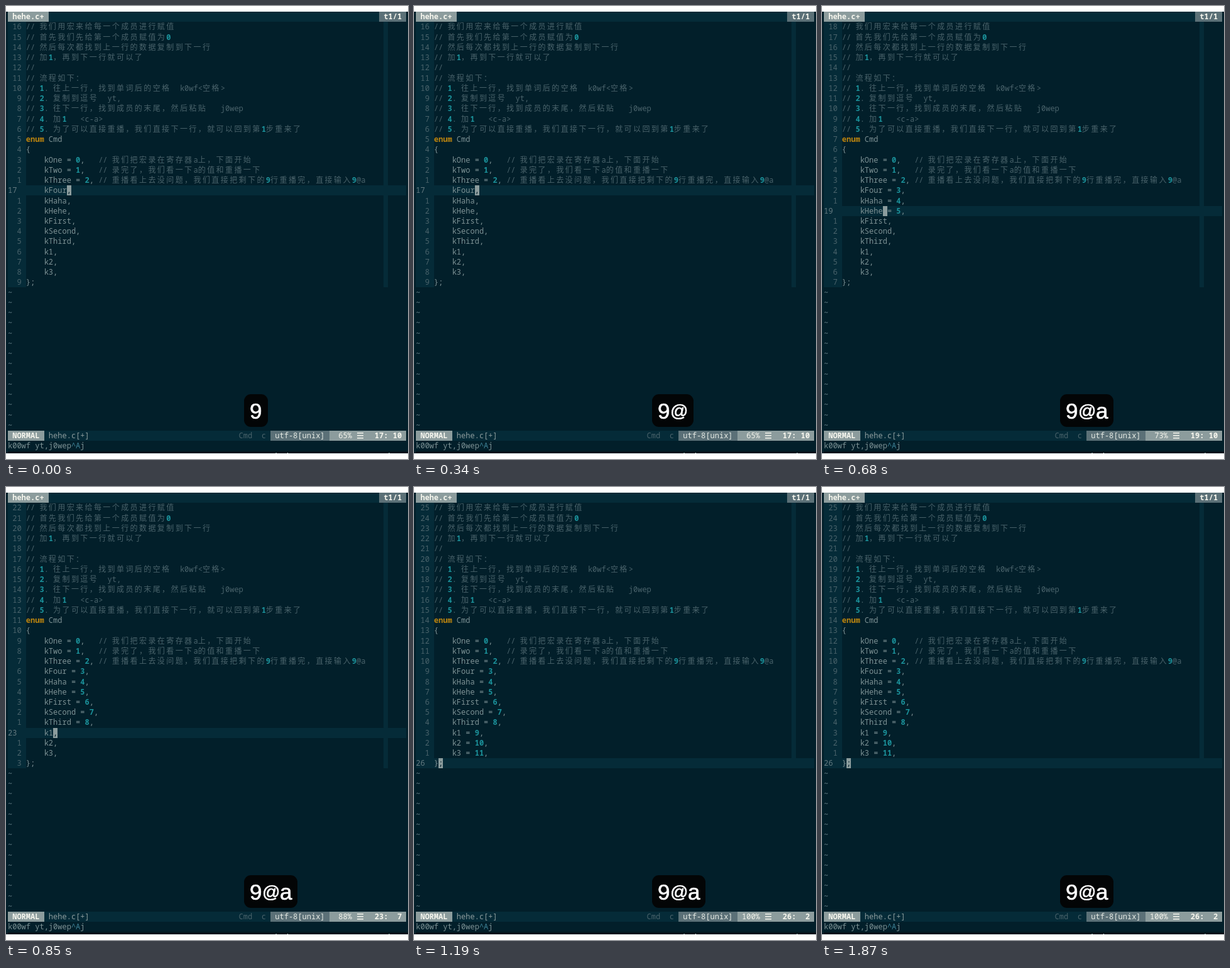
Write an HTML page with a canvas that moves like this. It is 640 by 720 pixels and loops after 2040 ms.

```html
<!DOCTYPE html>
<html lang="zh">
<head>
<meta charset="utf-8">
<title>Vim macro replay</title>
<style>
html, body { margin: 0; width: 100%; height: 100%; overflow: hidden; background: #fff; }
canvas { display: block; }
</style>
</head>
<body>
<canvas id="stage" width="640" height="720"></canvas>
<script>
const ctx = document.getElementById('stage').getContext('2d');
const LOOP = 2040, LEFT = 3, TOP = 9, BOTTOM = 711, CELL = 7.208, ROW = 16.24;
const MONO = '"Noto Sans Mono", "Noto Sans CJK SC", "Noto Sans CJK", monospace';
const BG = '#021f2a', PANEL = '#052b38', DIM = '#4a636b', TEXT = '#7d9194',
      CYAN = '#1b929b', YELLOW = '#bf860e', LIGHT = '#8c9c9d', MID = '#5b7077', WHITE = '#f6f6ee';

const intro = `// 我们用宏来给每一个成员进行赋值
// 首先我们先给第一个成员赋值为0
// 然后每次都找到上一行的数据复制到下一行
// 加1，再到下一行就可以了
//
// 流程如下：
// 1. 往上一行，找到单词后的空格  k0wf<空格>
// 2. 复制到逗号  yt,
// 3. 往下一行，找到成员的末尾，然后粘贴   j0wep
// 4. 加1   <c-a>
// 5. 为了可以直接重播，我们直接下一行，就可以回到第1步重来了
enum Cmd
{`.split('\n');
const members = ['One', 'Two', 'Three', 'Four', 'Haha', 'Hehe', 'First', 'Second', 'Third', '1', '2', '3'];
const notes = ['我们把宏录在寄存器a上，下面开始', '录完了，我们看一下a的值和重播一下',
  '重播看上去没问题，我们直接把剩下的9行重播完，直接输入9@a'];

// Each step holds until the next one starts.
const steps = [
  { at: 0, keys: '9', line: 17, col: 10, filled: 3 },
  { at: 340, keys: '9@', line: 17, col: 10, filled: 3 },
  { at: 680, keys: '9@a', line: 19, col: 10, filled: 6 },
  { at: 850, keys: '9@a', line: 23, col: 7, filled: 9 },
  { at: 1020, keys: '9@a', line: 26, col: 2, filled: 12 }
];

const colX = col => LEFT + col * CELL;
const rowY = row => TOP + row * ROW;

function fill(col, row, cols, rows, color) {
  const x = Math.round(colX(col)), y = Math.round(rowY(row));
  ctx.fillStyle = color;
  ctx.fillRect(x, y, Math.round(colX(col + cols)) - x, Math.round(rowY(row + rows)) - y);
}

// Writes on the terminal grid and returns the next free column.
function put(col, row, text, color, weight = 400) {
  ctx.font = `${weight} 12px ${MONO}`;
  ctx.fillStyle = color;
  for (const ch of text) {
    ctx.fillText(ch, colX(col), rowY(row) + 12.2);
    col += ch > '\u2e80' ? 2 : 1;
  }
  return col;
}

function putCode(row, line) {
  let col = 4, color = TEXT;
  for (const part of line.split(/(\/\/|\benum\b|\b\d+\b)/)) {
    if (part === '//') color = DIM;
    if (part === 'enum') col = put(col, row, part, YELLOW, 600);
    else if (/^\d+$/.test(part)) col = put(col, row, part, CYAN, 600);
    else col = put(col, row, part, color);
  }
}

function sourceLines(filled) {
  const body = members.map((name, i) => {
    const code = `    k${name}${i < filled ? ' = ' + i : ''},`;
    return notes[i] ? code.padEnd(16) + '// ' + notes[i] : code;
  });
  return [...intro, ...body, '};'];
}

function drawTabs() {
  fill(0, 0, 88, 1, PANEL);
  fill(0, 0, 9, 1, LIGHT);
  put(1, 0, 'hehe.c+', WHITE, 700);
  fill(82, 0, 6, 1, MID);
  put(83, 0, 't1/1', WHITE, 600);
}

function drawBuffer({ line, col, filled }) {
  const lines = sourceLines(filled);
  fill(0, 1, 4, 26, PANEL);
  fill(83, 1, 1, 26, PANEL);
  fill(0, line, 88, 1, PANEL);
  lines.forEach((code, i) => {
    const row = i + 1, gap = Math.abs(row - line);
    if (gap) put(0, row, String(gap).padStart(3), DIM);
    else put(0, row, String(row), '#647a80');
    putCode(row, code);
  });
  fill(col + 3, line, 1, 1, LIGHT);
  put(col + 3, line, lines[line - 1][col - 1], BG);
  for (let row = 27; row < 41; row++) put(0, row, '~', '#668088');
}

function drawStatus({ line, col }) {
  fill(0, 41, 88, 1, PANEL);
  fill(0, 41, 8, 1, LIGHT);
  put(1, 41, 'NORMAL', WHITE, 700);
  put(9, 41, 'hehe.c[+]', LIGHT);
  put(51, 41, 'Cmd  c', DIM);
  fill(58, 41, 13, 1, MID);
  put(59, 41, 'utf-8[unix]', '#e6ebe5');
  fill(71, 41, 17, 1, LIGHT);
  put(72, 41, (Math.floor(line / 26 * 100) + '%').padStart(4), WHITE, 500);
  ctx.fillStyle = WHITE;
  for (const y of [678, 682, 686]) ctx.fillRect(559, y, 10, 1.5);
  put(81, 41, line + ':' + String(col).padStart(3), WHITE, 700);

  let end = put(0, 42, 'k00wf yt,j0wep', TEXT);
  end = put(end, 42, '^A', '#3f8398');
  put(end, 42, 'j', TEXT);
  fill(0, 43, 89, 1, '#00141c');
  put(53, 43, '"~/work/demo/macro" 14:00 27-Feb-17', WHITE);
}

function drawKeys(keys) {
  const widths = { '9': 20, '@': 28, a: 19 };
  const total = [...keys].reduce((sum, key) => sum + widths[key], 18);
  ctx.fillStyle = '#030506';
  ctx.beginPath();
  ctx.roundRect(379, 617, total, 52, 11);
  ctx.fill();
  ctx.fillStyle = ctx.strokeStyle = '#fff';
  ctx.lineWidth = 0.7;
  let x = 388;
  for (const key of keys) {
    const small = key === '@';
    ctx.font = `${small ? 28 : 35}px "Liberation Sans", sans-serif`;
    const y = small ? 653 : 656;
    ctx.fillText(key, x, y);
    ctx.strokeText(key, x, y);
    x += widths[key];
  }
}

function draw(now) {
  const t = now % LOOP;
  const step = steps.findLast(s => s.at <= t);
  ctx.fillStyle = '#fff';
  ctx.fillRect(0, 0, 640, 720);
  ctx.save();
  ctx.beginPath();
  ctx.rect(0, TOP, 640, BOTTOM - TOP);
  ctx.clip();
  ctx.fillStyle = BG;
  ctx.fillRect(0, TOP, 640, BOTTOM - TOP);
  drawTabs();
  drawBuffer(step);
  drawStatus(step);
  drawKeys(step.keys);
  ctx.restore();
}

function tick() {
  draw(performance.now());
  requestAnimationFrame(tick);
}
tick();
</script>
</body>
</html>
```
